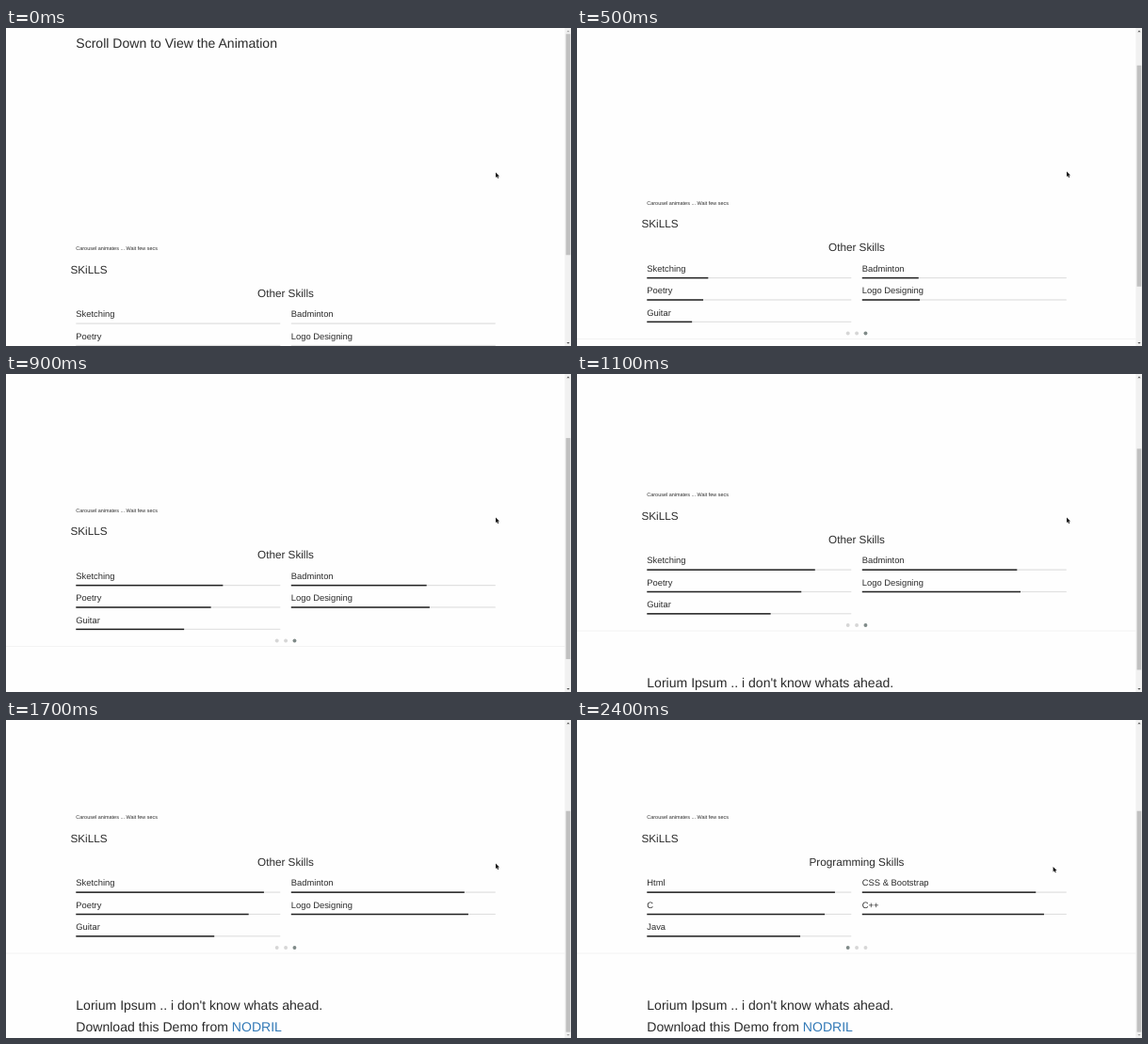
Write an HTML page that moves like this. It is 600x338 px and loops after 4400 ms.

```html
<!DOCTYPE html>
<html lang="en">
<head>
<meta charset="utf-8">
<title>Skill bars</title>
<style>
  html, body { margin: 0; width: 100%; height: 100%; overflow: hidden; background: #fefefe; }
  svg { display: block; width: 100%; height: 100%; }
  text { font-family: "Liberation Sans", Arial, sans-serif; fill: #2b2b2b; text-rendering: geometricPrecision; }
  .h1 { font-size: 14.06px; }
  .h2 { font-size: 11.72px; }
  .h3 { font-size: 9.375px; }
  .note { font-size: 5.47px; }
  .link { fill: #337ab7; }
  .track { fill: #e0e0e0; }
  .bar { fill: #222; }
</style>
</head>
<body>
<svg viewBox="0 0 600 338">
  <clipPath id="frame"><rect x="68.4" y="265" width="457" height="104"/></clipPath>
  <g id="page">
    <text class="h1" x="74.3" y="20.6">Scroll Down to View the Animation</text>
    <text class="note" x="74.3" y="236.4">Carousel animates ... Wait few secs</text>
    <text class="h2" x="68.4" y="260.6">SKiLLS</text>
    <g clip-path="url(#frame)"><g id="slides"></g></g>
    <g id="dots"></g>
    <rect y="378.8" width="593.4" height=".5" fill="#e6e6e6"/>
    <text class="h1" x="74.3" y="439">Lorium Ipsum .. i don't know whats ahead.</text>
    <text class="h1" x="74.3" y="462.3">Download this Demo from <tspan class="link">NODRIL</tspan></text>
  </g>
  <rect x="593.4" width="6.6" height="338" fill="#f1f1f1"/>
  <rect id="thumb" x="594.6" width="4.7" height="235" fill="#c1c1c1"/>
  <path id="up" d="M595.4 4.2h3.2l-1.6-1.8z"/>
  <path id="down" d="M595.4 334h3.2l-1.6 1.8z"/>
  <path id="cursor" d="M0 0v5.4l1.3-1.1.9 2 1-.4-.9-2h1.7z" fill="#111" stroke="#fff" stroke-width=".5" paint-order="stroke"/>
</svg>
<script>
const LOOP = 4400, STEP = 100;
const COLUMN_X = [74.3, 302.8], COLUMN_WIDTH = 217, ROW = 23.35, SLIDE_STRIDE = 461;
const BARS = { start: 180, duration: 1500 };
const SLIDE = { start: 2033, duration: 250 };
// Scroll offset keys: [time, offset]
const SCROLL = [[0, 0], [300, 24], [700, 73], [1100, 106], [1300, 131]];
const POINTER_X = [[2100, 520], [2400, 505.6]];
const POINTER_Y = [[0, 153.5], [300, 152.6], [2100, 152.6], [2400, 156]];

// Skills fill row by row, left column first: [name, level]
const slides = [
  ["Other Skills", [["Sketching", .92], ["Badminton", .848], ["Poetry", .845], ["Logo Designing", .867], ["Guitar", .677]]],
  ["Programming Skills", [["Html", .92], ["CSS & Bootstrap", .85], ["C", .87], ["C++", .89], ["Java", .75]]],
];

const $ = id => document.getElementById(id);
const clamp = v => Math.min(1, Math.max(0, v));

function make(tag, parent, attributes, content = "") {
  const node = document.createElementNS("http://www.w3.org/2000/svg", tag);
  for (const name in attributes) node.setAttribute(name, attributes[name]);
  node.textContent = content;
  return parent.appendChild(node);
}

function interpolate(keys, time) {
  for (let i = 1; i < keys.length; i++) {
    const [t0, v0] = keys[i - 1], [t1, v1] = keys[i];
    if (time < t1) return v0 + (v1 - v0) * clamp((time - t0) / (t1 - t0));
  }
  return keys[keys.length - 1][1];
}

// CSS "ease": cubic-bezier(.25, .1, .25, 1)
function ease(x) {
  const bezier = (u, a, b) => 3 * u * (1 - u) ** 2 * a + 3 * u * u * (1 - u) * b + u ** 3;
  let low = 0, high = 1;
  for (let i = 0; i < 24; i++) {
    const mid = (low + high) / 2;
    if (bezier(mid, .25, .25) < x) low = mid; else high = mid;
  }
  return bezier(high, .1, 1);
}

const progress = (phase, time) => ease(clamp((time - phase.start) / phase.duration));

const bars = [];
slides.forEach(([title, skills], index) => {
  const group = make("g", $("slides"), { transform: `translate(${index * SLIDE_STRIDE} 0)` });
  make("text", group, { class: "h2", x: 297, y: 285.5, "text-anchor": "middle" }, title);
  skills.forEach(([name, level], i) => {
    const x = COLUMN_X[i % 2], y = 307.4 + Math.floor(i / 2) * ROW;
    make("text", group, { class: "h3", x, y }, name);
    make("rect", group, { class: "track", x, y: y + 6.1, width: COLUMN_WIDTH, height: 1.2 });
    const node = make("rect", group, { class: "bar", x, y: y + 6, height: 1.5, width: 0 });
    bars.push({ node, level });
  });
});
const dots = [0, 1, 2].map(i => make("circle", $("dots"), { cx: 287.7 + i * 9.375, cy: 373, r: 1.95 }));

function draw(time) {
  const scroll = interpolate(SCROLL, time);
  $("page").setAttribute("transform", `translate(0 ${-scroll})`);
  $("thumb").setAttribute("y", 6.3 + scroll * .69);
  $("up").setAttribute("fill", scroll > 0 ? "#505050" : "#a3a3a3");
  $("down").setAttribute("fill", scroll < 131 ? "#505050" : "#a3a3a3");

  const grown = progress(BARS, time);
  for (const { node, level } of bars) node.setAttribute("width", COLUMN_WIDTH * level * grown);

  $("slides").setAttribute("transform", `translate(${-SLIDE_STRIDE * progress(SLIDE, time)} 0)`);
  const active = time < SLIDE.start ? 2 : 0;
  dots.forEach((dot, i) => dot.setAttribute("fill", i === active ? "#7f8a88" : "#d6d6d6"));

  $("cursor").setAttribute("transform", `translate(${interpolate(POINTER_X, time)} ${interpolate(POINTER_Y, time)})`);
}

// The picture advances ten times a second.
const startTime = performance.now();
function tick() {
  const time = (performance.now() - startTime) % LOOP;
  draw(Math.floor(time / STEP) * STEP);
  requestAnimationFrame(tick);
}
tick();
</script>
</body>
</html>
```
